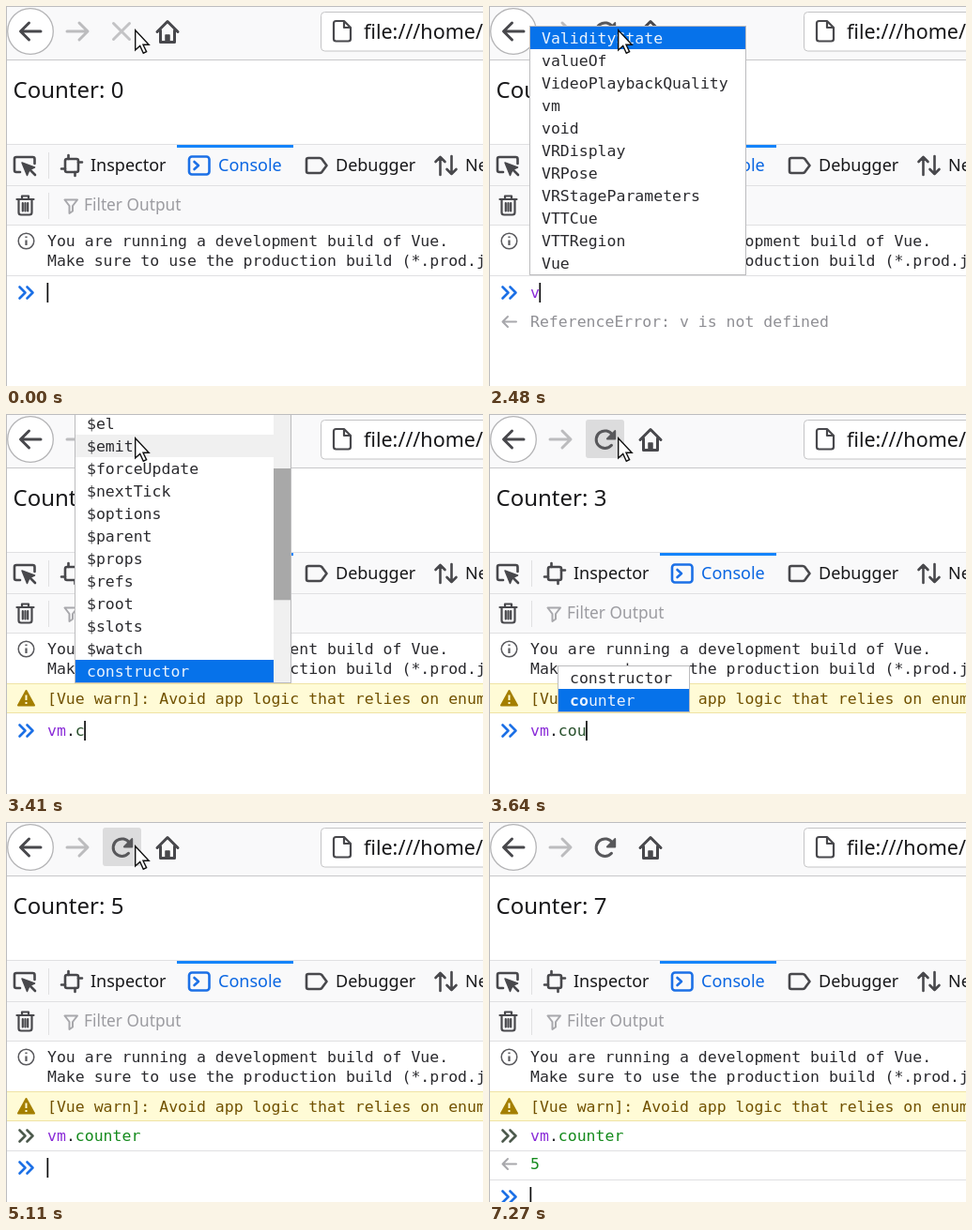
Write an HTML page that moves like this. It is 508 px wide and 405 px high and loops after 7360 ms.

```html
<!DOCTYPE html>
<html lang="en">
<head>
<meta charset="utf-8">
<title>Counter</title>
<style>
  html, body { margin: 0; width: 100%; height: 100%; overflow: hidden; background: #fff; }
  #stage { display: block; width: 508px; height: 405px; }
  text { white-space: pre; font-family: "Noto Sans", "Open Sans", sans-serif; fill: #18181a; }
  .mono text, #prompt text { font: 16.5px "DejaVu Sans Mono", monospace; fill: #2a2a2e; }
  #stage .sel { fill: #eaf3fd; }
  .tab { font-size: 18px; }
  .icon { fill: none; stroke: #48484c; stroke-width: 2.6; stroke-linejoin: round; stroke-linecap: round; }
  .bold { stroke-width: 3; }
  .thin { stroke-width: 1.5; }
  .blue { stroke: #1c70e6; }
  .pale { stroke: #a8a8ac; stroke-width: 2; }
  .solid { fill: #48484c; }
  .rule { fill: #e0e0e2; }
  #stage .obj { fill: #8a2bd8; }
  #stage .prop { fill: #148a1c; }
  #stage .dim { fill: #8f8f94; }
  #stage .warn { fill: #715100; }
</style>
</head>
<body>
<svg id="stage" viewBox="0 0 508 405">
  <defs>
    <path id="chev" d="M14.5 -6l6 6-6 6M22.5 -6l6 6-6 6"/>
    <path id="ret" d="M29 0H15M20 -5.5L14.5 0l5.5 5.5"/>
  </defs>
  <rect width="508" height="405" fill="#fff"/>

  <!-- browser toolbar -->
  <rect width="508" height="57" fill="#f9f9fa"/>
  <rect y="57" width="508" height="1" fill="#c8c8ca"/>
  <circle cx="26" cy="27" r="24.3" fill="#fff" stroke="#b4b4b6" stroke-width="1.3"/>
  <path class="icon bold" d="M37 27H16M24.5 18L15.5 27l9 9"/>
  <path class="icon bold" style="stroke:#bcbcbe" d="M65 27H86M78 18l9 9-9 9"/>
  <rect data-on="620-2480 2630-2930 3490-6350" x="103" y="6" width="41" height="41" rx="3" fill="#dcdcdd"/>
  <path id="stop" class="icon bold" style="stroke:#c3c3c5" d="M-8.5 -8.5L8.5 8.5M8.5 -8.5L-8.5 8.5"/>
  <g id="reload">
    <path class="icon bold" style="stroke:#58585b" d="M7 6.3A9.3 9.3 0 1 1 8 -4.5"/>
    <path fill="#58585b" d="M10.7 -10q1 0 1 1V-.5q0 1-1 1H2.2q-1.5-.5-.5-1.7L10 -9.6z"/>
  </g>
  <g class="icon bold">
    <path d="M161 27.5L172 16.5l11 11M164.5 26V38.500h15V26"/>
    <path class="solid thin" d="M170 31h4v7h-4z"/>
  </g>
  <rect x="335.5" y="6.5" width="190" height="41.5" rx="4" fill="#fff" stroke="#c4c4c6"/>
  <path class="icon" style="stroke-width:2.2" d="M349 18.5q0-2.500 2.500-2.500H360l7 7V35q0 2.500-2.500 2.500h-13q-2.500 0-2.500-2.500zM360 16v7h7"/>
  <text x="381" y="35" font-size="21.5">file:///home/</text>

  <text x="7.5" y="98" font-size="24" id="counter"></text>

  <!-- tool tabs -->
  <rect y="148" width="508" height="85" fill="#f9f9fa"/>
  <rect class="rule" y="147" width="508" height="1"/>
  <rect class="rule" y="191" width="508" height="1"/>
  <rect class="rule" y="233" width="508" height="1"/>
  <rect class="rule" x="45" y="156" width="1" height="28"/>
  <rect class="rule" x="45" y="199" width="1" height="28"/>
  <rect x="182" y="148" width="124" height="3" fill="#1484fa"/>
  <g class="icon">
    <path d="M15 177h-4q-2 0-2-2V163q0-2 2-2H28.500q2 0 2 2v5"/>
    <path class="solid thin" d="M17 167l13.500 5-5.500 2.500-2.500 6z"/>
    <path d="M26 175l5 5"/>
    <rect x="63" y="163" width="14" height="14" rx="2"/>
    <path d="M66.500 163v-4M73.500 177v4M63 173.500h-4M77 166.500h4"/>
    <path d="M322 162h12q1.500 0 2.500 1.200l5 6.800-5 6.800q-1 1.200-2.500 1.200H322q-2 0-2-2V164q0-2 2-2z"/>
    <path d="M462.500 180V161M457.500 166l5-5 5 5M474.500 160v19M469.500 174l5 5 5-5"/>
    <g class="blue"><rect x="195" y="160.500" width="21.500" height="19" rx="3"/><path d="M200.500 166l4.500 4-4.500 4"/></g>
  </g>
  <text class="tab" x="90" y="176">Inspector</text>
  <text class="tab" x="226" y="176" style="fill:#0a66e2">Console</text>
  <text class="tab" x="351" y="176">Debugger</text>
  <text class="tab" x="489" y="176">Ne</text>

  <g class="icon">
    <path style="stroke-width:2.2" d="M11.500 206h18M17 205v-2.500h7V205M13.500 207v13q0 2.500 2.500 2.500h9q2.500 0 2.500-2.500V207M17.800 210v8.500M20.500 210v8.500M23.200 210v8.500"/>
    <path class="pale" d="M62.500 206.500h13.500l-5 6.500v5.500l-3.500 2.500v-8z"/>
  </g>
  <text x="83" y="218" font-size="17.3" style="fill:#9c9ca1">Filter Output</text>

  <!-- console output -->
  <g class="mono">
    <circle cx="21.5" cy="250.5" r="8.3" fill="none" stroke="#5a5a5e" stroke-width="1.5"/>
    <path d="M21.5 249.500v5.500M21.5 245.500v1.500" stroke="#5a5a5e" stroke-width="2.2"/>
    <text x="44" y="256">You are running a development build of Vue.</text>
    <text x="44" y="277">Make sure to use the production build (*.prod.js)</text>
    <rect class="rule" y="287" width="508" height="1"/>
    <g data-on="3010-7360">
      <rect y="287" width="508" height="32" fill="#efe3a4"/>
      <rect y="288" width="508" height="30" fill="#fffbd6"/>
      <path d="M21.5 295l8.500 15.500H13z" fill="#a47f00" stroke="#a47f00" stroke-width="2" stroke-linejoin="round"/>
      <path d="M21.5 299.500v5.500M21.5 307v2" stroke="#fffbd6" stroke-width="2"/>
      <text class="warn" x="44" y="309">[Vue warn]: Avoid app logic that relies on enumerating</text>
    </g>
    <g data-on="5110-7360">
      <use href="#chev" y="334.5" class="icon" style="stroke:#4d5a4d"/>
      <text x="44" y="340"><tspan class="obj">vm</tspan>.<tspan class="prop">counter</tspan></text>
      <rect class="rule" y="350" width="508" height="1"/>
    </g>
    <g data-on="5190-7360">
      <use href="#ret" y="364.5" class="icon pale"/>
      <text class="prop" x="44" y="370">5</text>
      <rect class="rule" y="381" width="508" height="1"/>
    </g>
    <g data-on="2480-2630">
      <use href="#ret" y="336.5" class="icon pale"/>
      <text class="dim" x="44" y="342">ReferenceError: v is not defined</text>
    </g>
    <g data-on="3490-3640">
      <use href="#ret" y="368.5" class="icon pale"/>
      <text class="dim" x="44" y="374">undefined</text>
    </g>
  </g>

  <g id="prompt">
    <use href="#chev" class="icon blue"/>
    <text x="44" y="5.5"><tspan class="obj" id="obj"></tspan><tspan id="dot"></tspan><tspan id="prop"></tspan><tspan class="dim" id="ghost"></tspan></text>
    <rect id="caret" y="-10.5" width="1.7" height="21" fill="#0c0c0d"/>
  </g>

  <g id="popups" class="mono"></g>
  <path d="M0 .5H508M.5 0V405" stroke="#bdbdbf" fill="none"/>
  <path id="mouse" d="M.7 .8V22l5-4.500 3.600 7.700 3.300-1.600-3.600-7.400h6.200z" fill="#fff" stroke="#111" stroke-width="1.4"/>
</svg>

<script>
const LOOP = 7360, CHAR = 9.93, ROW = 24;
const $ = id => document.getElementById(id);

// Completion list; `sel` is the highlighted row, `bold` its matched prefix length.
function popup(on, x, y, h, items, { sel, scroll = 0, hover = -1, bold = 0, bar = false }) {
  const longest = Math.max(...items.map(s => s.length));
  const w = Math.round(32 + longest * CHAR), view = h - 2;
  const rows = items.map((s, i) => {
    const top = i * ROW - scroll, cur = i === sel;
    const fill = cur ? '#0672ea' : i === hover ? '#f0f0f0' : '#fff';
    const label = cur ? `<tspan font-weight="bold">${s.slice(0, bold)}</tspan>${s.slice(bold)}` : s;
    return `<rect y="${top}" width="${w}" height="${ROW}" fill="${fill}"/>
      <text x="12" y="${top + 17.5}"${cur ? ' class="sel"' : ''}>${label}</text>`;
  }).join('');
  const k = view / (items.length * ROW);
  const track = bar ? `<rect x="${w - 20}" width="18" height="${view}" fill="#f0f0f0"/>
    <rect x="${w - 20}" y="${scroll * k}" width="18" height="${view * k}" fill="#a8a8a8"/>` : '';
  $('popups').insertAdjacentHTML('beforeend', `<g data-on="${on}">
    <rect x="${x + .5}" y="${y + .5}" width="${w - 1}" height="${h - 1}" fill="#fff" stroke="#bcbcbe"/>
    <svg x="${x + 1}" y="${y + 1}" width="${w - 2}" height="${view}">${rows}${track}</svg></g>`);
}

const globals = ('ValidityState valueOf VideoPlaybackQuality vm void ' +
  'VRDisplay VRPose VRStageParameters VTTCue VTTRegion Vue').split(' ');
const members = ('_ __defineGetter__ __defineSetter__ __lookupGetter__ __lookupSetter__ __proto__ ' +
  '$attrs $data $el $emit $forceUpdate $nextTick $options $parent $props $refs $root $slots $watch ' +
  'constructor counter hasOwnProperty isPrototypeOf propertyIsEnumerable toLocaleString toSource toString valueOf').split(' ');
const matches = ['constructor', 'counter'];

popup('2480-2550', 43, 21, 266, globals, { sel: 0 });
popup('2550-2630', 43, 21, 266, globals, { sel: 3, hover: 0 });
popup('2930-3410', 73, -22, 309, members, { sel: 0, hover: 1, bar: true });
popup('3410-3490', 73, -22, 309, members, { sel: 19, hover: 9, scroll: 173, bar: true });
popup('3490-3560', 73, 268, 50, matches, { sel: 0, bold: 1 });
popup('3560-3640', 73, 268, 50, matches, { sel: 0, bold: 2 });
popup('3640-3720', 73, 268, 50, matches, { sel: 1, bold: 2 });

// start, prompt centre y, typed text, caret shown, suggested rest
const typing = [
  [0, 305.5, '', 1], [80, 305.5, '', 0], [620, 305.5, '', 1], [1160, 305.5, '', 0],
  [1710, 305.5, '', 1], [2240, 305.5, '', 0], [2320, 305.5, 'v', 1], [2550, 305.5, 'vm', 1],
  [2780, 305.5, 'vm.', 1, '_'], [3010, 337.5, 'vm.', 1, '_'], [3410, 337.5, 'vm.c', 1],
  [3490, 337.5, 'vm.c', 1, 'onstructor'], [3560, 337.5, 'vm.co', 1, 'nstructor'],
  [3640, 337.5, 'vm.cou', 1], [3720, 337.5, 'vm.cou', 1, 'nter'],
  [4250, 337.5, 'vm.cou', 0, 'nter'], [4730, 337.5, 'vm.counter', 1],
  [5110, 368.5, '', 1], [5190, 399.5, '', 1], [5650, 399.5, '', 0], [6200, 399.5, '', 1],
  [6730, 399.5, '', 0], [7270, 399.5, '', 1]
];
const ticks = [850, 1860, 2860, 3790, 4800, 5800, 6810];
const mouse = [[0, 137, 25], [6350, 214, 52], [6430, 335, 118], [6500, 476, 207], [6580, 600, 300]];

const timed = [...document.querySelectorAll('[data-on]')].map(el =>
  [el, el.dataset.on.split(' ').map(span => span.split('-').map(Number))]);
const at = (list, t) => list.filter(s => s[0] <= t).pop();
const show = (el, on) => { el.style.visibility = on ? 'visible' : 'hidden'; };

function draw(t) {
  for (const [el, spans] of timed) show(el, spans.some(([a, b]) => t >= a && t < b));

  $('counter').textContent = 'Counter: ' + ticks.filter(s => s <= t).length;

  const [, y, typed, caret, ghost = ''] = at(typing, t);
  $('prompt').setAttribute('transform', `translate(0 ${y})`);
  $('obj').textContent = typed.slice(0, 2);
  $('dot').textContent = typed.slice(2, 3);
  $('prop').textContent = typed.slice(3);
  $('prop').style.fill = typed.length > 6 ? '#148a1c' : '#28502c';
  $('ghost').textContent = ghost;
  $('caret').setAttribute('x', 43.5 + typed.length * CHAR);
  show($('caret'), caret);

  // the stop cross shrinks away, then the reload arrow turns in
  const p = t < 80 ? 0 : Math.min(5, Math.floor((t - 80) / 77.5) + 1) / 5;
  const out = Math.max(0, 1 - p * 2), into = Math.max(0, p * 2 - 1);
  $('stop').setAttribute('transform', `translate(123 27) scale(${out})`);
  show($('stop'), out > 0);
  $('reload').setAttribute('transform', `translate(123.5 27) rotate(${(into - 1) * 120}) scale(${into})`);
  $('reload').setAttribute('opacity', t < 620 ? .4 : 1);
  show($('reload'), into > 0);

  const [, mx, my] = at(mouse, t);
  $('mouse').setAttribute('transform', `translate(${mx} ${my})`);
}

const start = performance.now();
function tick(now) {
  draw(Math.max(0, now - start) % LOOP);
  requestAnimationFrame(tick);
}
draw(0);
requestAnimationFrame(tick);
</script>
</body>
</html>
```
